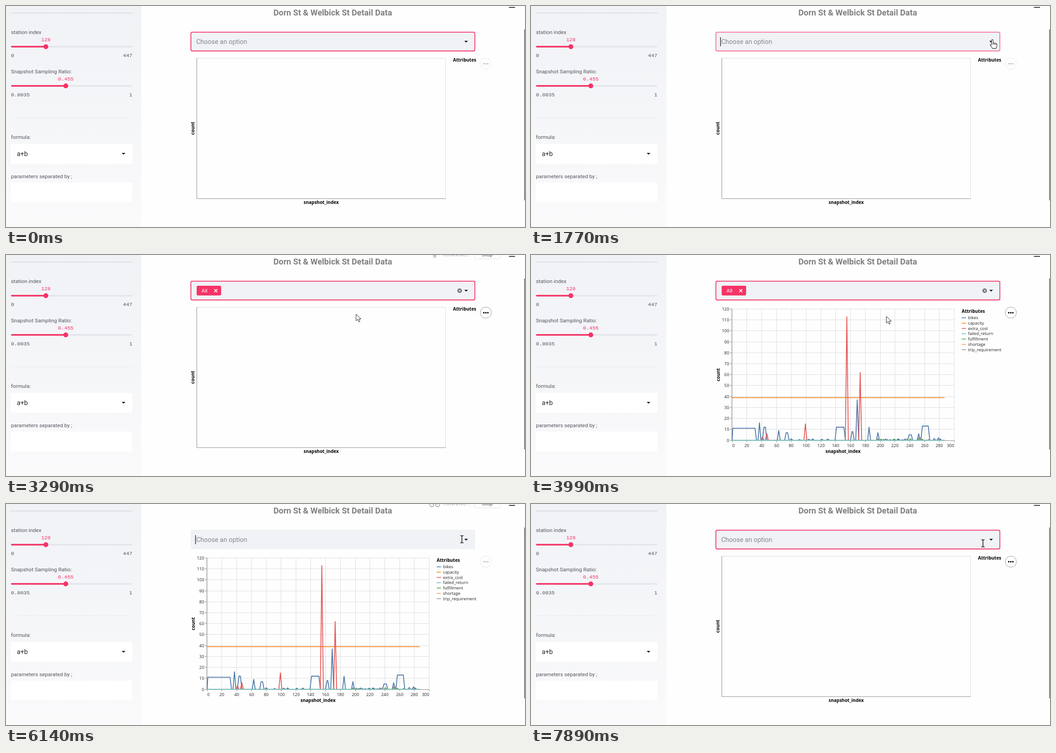
Recreate the animation shown at these times as an HTML page. Size 1146 by 489 pixels, loop 8 s.

```html
<!DOCTYPE html>
<html lang="en">
<head>
<meta charset="utf-8">
<style>
html, body { margin: 0; width: 100%; height: 100%; overflow: hidden; background: #fff; }
svg { display: block; width: 1146px; height: 489px; font: 11.75px Roboto, sans-serif; fill: #53555e; }
.mono { font: 11.5px "Liberation Mono", monospace; }
.pink { fill: #f63366; }
.big { font-size: 14.4px; }
.hint { fill: #86878e; }
.dark { fill: #262730; }
.plot { font: 9.3px "Open Sans", sans-serif; fill: #222; }
.bold { font: bold 10px "Open Sans", sans-serif; fill: #000; }
.mid { text-anchor: middle; }
.end { text-anchor: end; }
.title { font-size: 18.2px; font-weight: 600; fill: #808080; }
</style>
</head>
<body>
<svg id="stage" viewBox="0 0 1146 489"></svg>
<script>
const LOOP = 8000, PINK = '#f63366';
const text = (x, y, s, cls = '', extra = '') => `<text x="${x}" y="${y}" class="${cls}" ${extra}>${s}</text>`;
const rect = (x, y, w, h, fill, extra = '') => `<rect x="${x}" y="${y}" width="${w}" height="${h}" fill="${fill}" ${extra}/>`;
const path = (d, stroke, width = 1) => `<path d="${d}" fill="none" stroke="${stroke}" stroke-width="${width}" stroke-linejoin="round"/>`;
const dot = (x, y, r, fill, extra = '') => `<circle cx="${x}" cy="${y}" r="${r}" fill="${fill}" ${extra}/>`;
const group = (id, s) => `<g id="${id}">${s}</g>`;
const range = n => [...Array(n).keys()];
const crisp = v => Math.floor(v) + .5;
const triangle = (x, y) => `<path d="M${x - 4} ${y - 2}h8l-4 4z" fill="#16181f"/>`;
const cross = (x, y, r, color, width) => path(`M${x - r} ${y - r}l${2 * r} ${2 * r}m0 ${-2 * r}l${-2 * r} ${2 * r}`, color, width);
const upright = (x, y, s) => text(0, 0, s, 'bold mid', `transform="translate(${x} ${y}) rotate(-90)"`);

const slider = (y, label, value, x, low, high) =>
  text(11, y - 28, label) + text(x, y - 12, value, 'mono pink mid') +
  rect(11, y - 1.8, 268, 3.6, '#e4e6ec', 'rx="1.8"') + rect(11, y - 1.8, x - 11, 3.6, PINK, 'rx="1.8"') +
  dot(x, y, 5.4, PINK) + text(11, y + 23, low, 'mono') + text(279, y + 23, high, 'mono end');
const field = y => rect(11, y, 268, 44, '#fff', 'rx="3.5"');

const sidebar = rect(0, 0, 299, 489, 'url(#fade)') +
  path('M11 15.5H279', '#c9cbd1') + path('M11 247.5H279', '#e9ebef') +
  slider(90, 'station index', '128', 88, '0', '447') +
  slider(176.7, 'Snapshot Sampling Ratio:', '0.455', 132, '0.0035', '1') +
  text(11, 294, 'formula:') + field(305) + text(24, 332, 'a+b', 'big dark') + triangle(259.5, 327) +
  text(11, 380.5, 'parameters separated by ;') + field(390.5);

let seed = 7;
const random = () => (seed = seed * 16807 % 2147483647) / 2147483647;
const noise = (n, from, to, top) => range(n).map(i => {
  const at = from + (i + random()) * (to - from) / n;
  return [at, at, .5 + random() * top];
});

// bumps: first snapshot, last snapshot, value; zero between them
const series = [
  ['bikes', '#4c78a8', [[1, 31, 11], [37, 37, 16], [43, 45, 12], [63, 63, 9], [73, 75, 7], ...noise(6, 80, 132, 1),
    [141, 151, 12], [162, 163, 8], [169, 169, 37], [185, 185, 12], [197, 197, 7], ...noise(7, 201, 234, 1),
    [239, 242, 5], [252, 252, 6], [257, 265, 13], ...noise(3, 270, 284, 2)]],
  ['capacity', '#f58518', [[0, 287, 39]]],
  ['extra_cost', '#e45756', [[41, 41, 3], [47, 47, 6], [99, 99, 15], [155, 155, 113], [173, 173, 62]]],
  ['failed_return', '#72b7b2', []],
  ['fulfillment', '#54a24b', noise(6, 185, 270, 1.8)],
  ['shortage', '#f2a65a', []],
  ['trip_requirement', '#a58a9f', noise(7, 190, 286, 2.2)],
];

const gridX = v => 444 + v * 490.5 / 300, gridY = v => 410 - v * 290.5 / 120;
const axes = range(16).map(i => {
  const x = crisp(gridX(i * 20)), side = i == 15 ? 'end' : i ? 'mid' : '';
  return path(`M${x} 119.5V410`, '#ddd') + path(`M${x} 410v4.5`, '#888') + text(x, 425, i * 20, 'plot ' + side);
}).join('') + range(13).map(i => {
  const y = crisp(gridY(i * 10));
  return path(`M444 ${y}H934.5`, '#ddd') + path(`M439.5 ${y}h4.5`, '#888') + text(437.5, y + 3, i * 10, 'plot end');
}).join('') + path('M443.5 119.5V410.5H934.5', '#888');
const curve = ([, color, bumps]) => path(bumps.map(([a, b, v]) => {
  const slope = b - a > 200 ? 0 : 2;
  return `M${gridX(Math.max(0, a - slope))} ${slope ? 410 : gridY(v)}L${gridX(a)} ${gridY(v)}H${gridX(b)}` +
    (slope ? `L${gridX(b + slope)} 410` : '');
}).join(''), color, 1.85);
const legend = text(951, 127.5, 'Attributes', 'bold') + series.map(([name, color], i) =>
  path(`M951 ${139 + i * 11.75}h9.5`, color, 1.6) + text(965, 142 + i * 11.75, name, 'plot')).join('');

const fullChart = axes + series.map(curve).join('') + path('M444 410H914', '#72b7b2', 1.85) + legend +
  upright(416.5, 265, 'count') + text(689, 438, 'snapshot_index', 'bold mid');
const emptyChart = path('M421 115.5H970.5V426', '#ddd') + path('M421.3 115V426.2H971', '#888') +
  upright(416, 270.5, 'count') + text(696, 438, 'snapshot_index', 'bold mid') + text(987, 123, 'Attributes', 'bold');

const chosen = rect(421, 68, 54, 21.5, PINK, 'rx="3"') + text(431.5, 83, 'All', '', 'style="fill:#fff"') +
  cross(463.3, 79, 3.3, '#fff', 1.7) + dot(1001.7, 79, 5.1, '#73747b') + cross(1001.7, 79, 1.9, '#f0f2f6', 1.2);

const menu = rect(408, 102, 627.5, 289, '#fff', 'rx="3" filter="url(#shade)"') + rect(408, 102, 627.5, 36, '#f0f2f6') +
  ['All', ...series.map(s => s[0])].map((s, i) => text(421, 125 + i * 36, s, 'big dark')).join('');

const wheel = x => dot(x, 1.5, 4.5, 'none', 'stroke="#999" stroke-width="1.4"');
const status = group('person', path('M943.5 0h6M945 0v6m3.4-6v6', '#999', 1.6)) +
  group('bike', wheel(940) + wheel(953) + path('M940 1l6-3 7 3', '#999')) +
  text(965, 3, 'RUNNING...', '', 'style="fill:#b5b6ba"') +
  rect(1034, -18, 57, 26.5, '#fff', 'rx="3.5" stroke="#e2e3e7"') + text(1062.5, 2.5, 'Stop', 'mid');

const arrow = '<path d="M0 0V14.6L3.6 11.4 6.2 17 8.6 16 6.2 10.5H11z" fill="#fff" stroke="#222"/>';
const hand = '<g transform="translate(.8 1) scale(1.06)"><path d="M-1.7 10.5V1a1.6 1.6 0 0 1 3.2 0V7q1.6-1.4 2.8.3 1.6-1 2.6.5 2.2-.6 2.4 1.5V13q0 3-2 4.8H.2q-1-2.5-4.8-6.6.4-2 2.9-.7z" fill="#fff" stroke="#222"/>' +
  path('M1.5 7v3.4m2.8-3v3m2.6-2.5v2.6', '#222', .9) + '</g>';
const beam = path('M-3.5-8Q0-8 0-6.5 0-8 3.5-8M0-7V7M-3.5 8Q0 8 0 6.5 0 8 3.5 8', '#111', 1.5);

const stage = document.getElementById('stage');
stage.innerHTML = `<defs>
  <linearGradient id="fade" x1="0" y1="0" x2="0" y2="1"><stop stop-color="#f0f2f6"/><stop offset="1" stop-color="#fafafb"/></linearGradient>
  <filter id="shade" x="-5%" y="-5%" width="110%" height="110%"><feDropShadow dx="0" dy="1" stdDeviation="2.2" flood-opacity=".2"/></filter>
  </defs>` + rect(0, 0, 1146, 489, '#fefefe') + sidebar +
  text(721.5, 20.5, 'Dorn St &amp; Welbick St Detail Data', 'mid title') +
  path('M1110.5 3.2h13.5', '#222', 1.8) + rect(1144, 52, 2, 378, '#85868a') +
  group('status', status) + group('empty', emptyChart) + group('full', fullChart) +
  group('more', dot(1059.5, 127.5, 12.3, '#fff', 'stroke="#999"') +
    [-4.5, 0, 4.5].map(d => dot(1059.5 + d, 127.7, 1.7, '#000')).join('')) +
  rect(407.5, 57, 628.5, 43, '#f0f2f6', 'rx="3.5"') +
  rect(408.3, 57.9, 627, 41.6, 'none', `id="focus" rx="3" stroke="${PINK}" stroke-width="1.8"`) +
  group('hint', text(420, 84, 'Choose an option', 'big hint')) + group('tag', chosen) + triangle(1016, 79) +
  group('caret', path('M418.5 69V89', '#111', 1.3)) + group('menu', menu) +
  group('pointer', group('arrow', arrow) + group('hand', hand) + group('beam', beam) +
    dot(0, 0, 11, '#f5f23c', 'id="click" fill-opacity=".75"'));

const el = {};
stage.querySelectorAll('[id]').forEach(e => el[e.id] = e);
const ramp = (t, a, b) => Math.max(0, Math.min(1, (t - a) / (b - a)));
const pulse = (t, a, b, d) => ramp(t, a, a + d) - ramp(t, b, b + d);
const within = (t, ...spans) => spans.some(([a, b]) => t >= a && t < b);
const show = (id, v) => el[id].setAttribute('opacity', +v);

// start, end, x, y, downward bend
const moves = [
  [460, 1130, 1018, 66, 0], [1270, 1280, 1018, 74, 0], [1930, 2340, 773, 131, 0],
  [3880, 4660, 984, 90, 42], [4740, 5060, 996, 88, -5], [5200, 5310, 999, 79, 0],
  [5850, 6450, 1015, 77, 0], [7000, 7740, 961, 111, 35], [7800, 7880, 998, 87, 0],
];
function place(t) {
  let x = 1030, y = 357;
  for (const [start, end, u, v, bend] of moves) {
    const p = ramp(t, start, end), e = p * p * (3 - 2 * p);
    x += (u - x) * e;
    y += (v - y) * e + bend * Math.sin(Math.PI * e);
    if (p < 1) break;
  }
  return [x, y];
}

function draw(t) {
  const tagged = within(t, [2850, 5850]), full = within(t, [3400, 6350]), open = within(t, [1850, 2850]);
  show('tag', tagged);
  show('hint', !tagged);
  show('full', full);
  show('empty', !full);
  show('menu', pulse(t, 1850, 2850, 90));
  show('status', pulse(t, 2900, 3480, 80) + pulse(t, 5950, 6380, 80));
  show('person', t < 5000);
  show('bike', t > 5000);
  show('caret', within(t, [1740, 2270], [5880, 6400], [7060, 7560]));
  show('focus', 1 - .7 * pulse(t, 1690, 1750, 40) - pulse(t, 5880, 7050, 150));

  const [x, y] = place(t);
  const kind = y > 101 ? (open ? 'hand' : 'arrow') : x >= 1008 || tagged && x > 997 ? 'hand' : 'beam';
  for (const k of ['arrow', 'hand', 'beam']) show(k, k == kind);
  show('pointer', t >= 460);
  show('click', within(t, [1530, 1690], [2610, 2830], [5630, 5830], [6770, 6990]));
  el.pointer.setAttribute('transform', `translate(${x} ${y})`);
  show('more', t >= 500 && !open && place(t - 90)[1] > 101 ? 1 : .22);
}

function tick(now) {
  draw(now % LOOP);
  requestAnimationFrame(tick);
}
draw(0);
requestAnimationFrame(tick);
</script>
</body>
</html>
```
